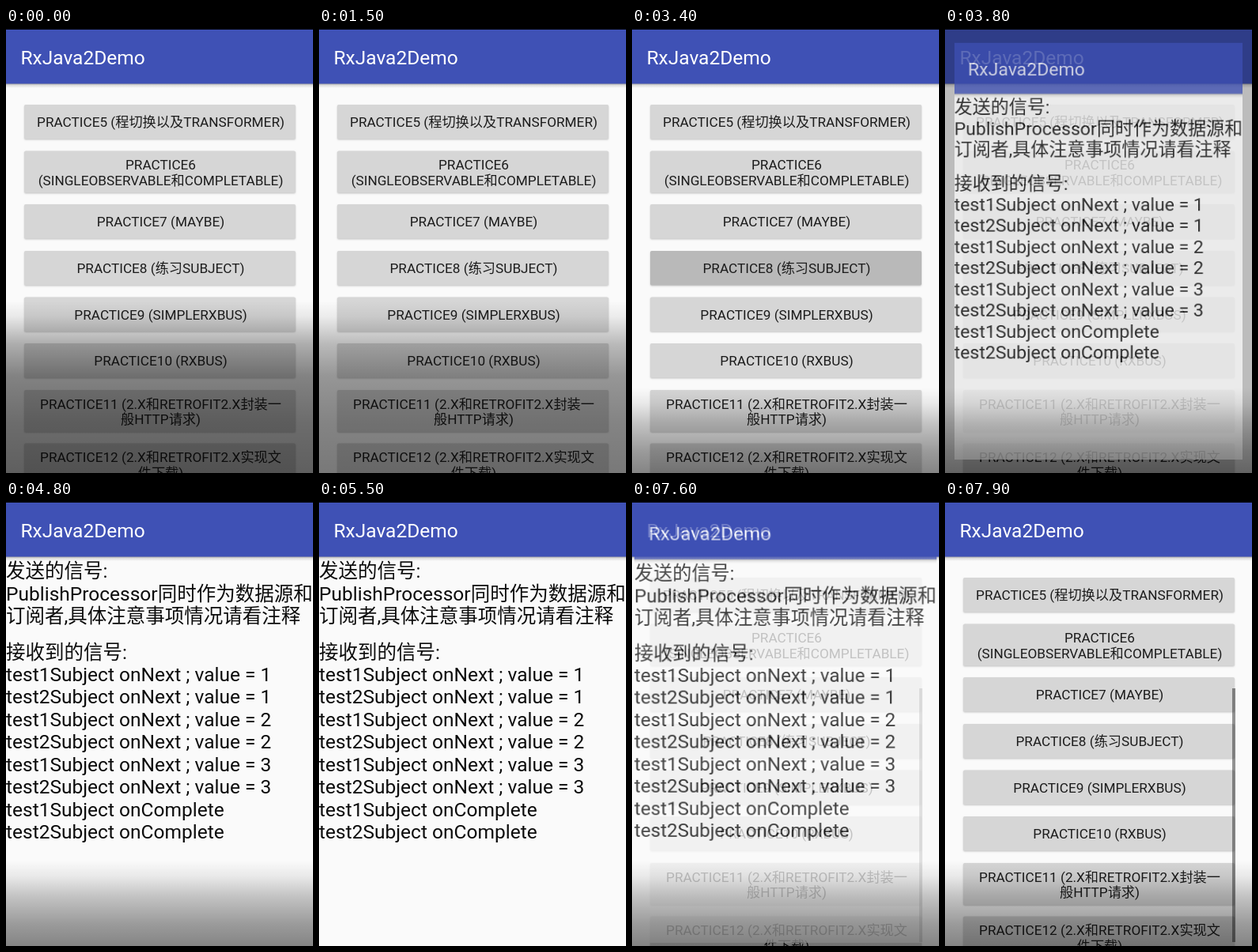
Write an HTML page with a canvas that moves like this. It is 388x563 px and loops after 8 s.

```html
<!DOCTYPE html>
<html lang="zh-CN">
<head>
<meta charset="utf-8">
<style>
html, body { margin: 0; width: 100%; height: 100%; overflow: hidden; background: #fafafa; }
canvas { display: block; }
</style>
</head>
<body>
<canvas id="stage" width="388" height="563"></canvas>
<script>
const W = 388, H = 563, LOOP = 8000;
const FONT = 'Roboto, "Noto Sans CJK SC", "Noto Sans CJK", sans-serif';
const ctx = document.getElementById('stage').getContext('2d');

// top, height, text lines
const buttons = [
  [97, 43.5, 'PRACTICE5 (程切换以及TRANSFORMER)'],
  [155.5, 53, 'PRACTICE6', '(SINGLEOBSERVABLE和COMPLETABLE)'],
  [223, 43.5, 'PRACTICE7 (MAYBE)'],
  [282, 43.5, 'PRACTICE8 (练习SUBJECT)'],
  [340.5, 43.5, 'PRACTICE9 (SIMPLERXBUS)'],
  [399, 43.5, 'PRACTICE10 (RXBUS)'],
  [458, 53, 'PRACTICE11 (2.X和RETROFIT2.X封装一', '般HTTP请求)'],
  [525.5, 53, 'PRACTICE12 (2.X和RETROFIT2.X实现文', '件下载)']
];
const sent = ['发送的信号:', 'PublishProcessor同时作为数据源和', '订阅者,具体注意事项情况请看注释'];
const received = ['接收到的信号:'];
for (let v = 1; v <= 3; v++)
  for (const n of [1, 2]) received.push(`test${n}Subject onNext ; value = ${v}`);
received.push('test1Subject onComplete', 'test2Subject onComplete');

const clamp = x => Math.max(0, Math.min(1, x));

function write(c, text, x, y, size, color, align = 'left') {
  c.font = `${size}px ${FONT}`;
  c.fillStyle = color;
  c.textAlign = align;
  c.fillText(text, x, y);
}

function drawBase(c) {
  c.fillStyle = '#fafafa';
  c.fillRect(0, 2, W, H - 2);
  const shadow = c.createLinearGradient(0, 70, 0, 76);
  shadow.addColorStop(0, 'rgba(0,0,0,.38)');
  shadow.addColorStop(.4, 'rgba(0,0,0,.12)');
  shadow.addColorStop(1, 'rgba(0,0,0,0)');
  c.fillStyle = shadow;
  c.fillRect(0, 70, W, 6);
  c.fillStyle = '#3f51b5';
  c.fillRect(0, 2, W, 68.5);
  write(c, 'RxJava2Demo', 18.5, 45.5, 24.5, '#fff');
}

function drawList(pressed, scrollbar) {
  drawBase(ctx);
  buttons.forEach(([y, h, ...lines], i) => {
    ctx.save();
    ctx.shadowColor = 'rgba(0,0,0,.2)';
    ctx.shadowBlur = 2;
    ctx.shadowOffsetY = 1;
    ctx.fillStyle = pressed && i === 3 ? '#b9b9b9' : '#d6d6d6';
    ctx.beginPath();
    ctx.roundRect(23, y, 343, h, 2);
    ctx.fill();
    ctx.restore();
    const base = lines.length > 1 ? y + 23.5 : y + 28.3;
    lines.forEach((s, k) => write(ctx, s, 195.5, base + k * 19.7, 17.2, '#1c1c1c', 'center'));
  });
  if (scrollbar) {
    ctx.fillStyle = 'rgba(0,0,0,.42)';
    ctx.fillRect(363, 237, 4, 321);
  }
}

const detail = document.createElement('canvas');
detail.width = W;
detail.height = H;
const dc = detail.getContext('2d');
drawBase(dc);
sent.forEach((s, i) => write(dc, s, 0, 97 + i * 28.5, 24.5, '#0c0c0c'));
received.forEach((s, i) => write(dc, s, 0, 199.5 + i * 28.45, 24.5, '#0c0c0c'));

function drawDetail(scale, alpha) {
  ctx.save();
  ctx.globalAlpha = alpha;
  ctx.translate(W / 2, H / 2);
  ctx.scale(scale, scale);
  ctx.drawImage(detail, -W / 2, -H / 2);
  ctx.restore();
}

// Black shade rising from the bottom edge; stops are [y, opacity]
function drawShade(stops, alpha) {
  if (alpha <= 0) return;
  const top = stops[0][0];
  const g = ctx.createLinearGradient(0, top, 0, H);
  for (const [y, a] of stops) g.addColorStop((y - top) / (H - top), `rgba(0,0,0,${a * alpha})`);
  ctx.fillStyle = g;
  ctx.fillRect(0, top, W, H - top);
}
const tall = [[345, 0], [365, .07], [400, .31], [440, .48], [500, .57], [H, .62]];
const low = [[455, 0], [475, .07], [500, .22], [535, .38], [H, .47]];

function draw(t) {
  const open = clamp((t - 3600) / 400);
  const close = clamp((t - 7500) / 400);

  if (open < 1 || close > 0) drawList(t >= 3400 && t < 3500, close > 0);
  if (close > 0) {
    drawDetail(1 - .24 * close * close, 1 - close);
  } else if (open > 0) {
    ctx.fillStyle = `rgba(0,0,0,${.5 * open})`;
    ctx.fillRect(0, 0, W, H);
    drawDetail(1 - .24 * (1 - open) ** 2, Math.min(1, open * 1.52));
  }

  drawShade(tall, 1 - clamp((t - 1400) / 600));
  const hide = clamp((t - 4900) / 600), show = clamp((t - 5800) / 300);
  drawShade(low, clamp((t - 2200) / 300) - hide + show);
  ctx.fillStyle = '#000';
  ctx.fillRect(0, 0, W, 2);
}

const start = performance.now();
function tick() {
  const t = (performance.now() - start) % LOOP;
  draw(Math.floor(t / 100) * 100); // ten pictures a second
  requestAnimationFrame(tick);
}
tick();
</script>
</body>
</html>
```
